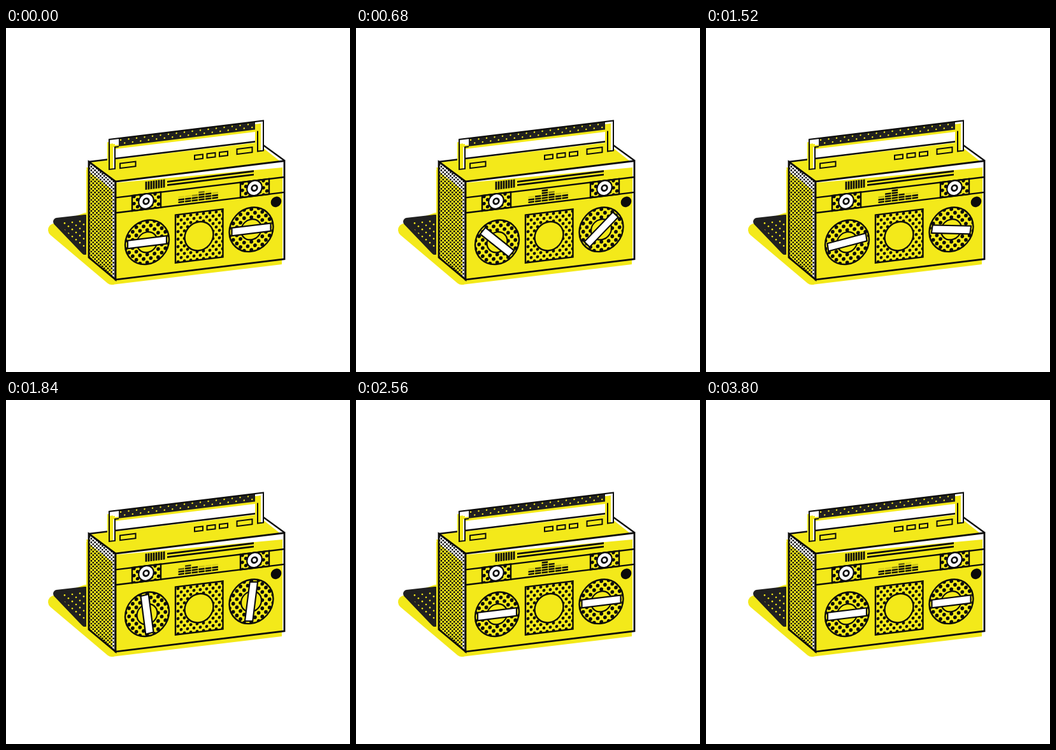
Animation of 540 by 540 pixels, one loop 3840 ms. Source, as an HTML page with a canvas:

```html
<!DOCTYPE html>
<html lang="en">
<head>
<meta charset="utf-8">
<title>Boombox</title>
<style>
html, body { margin: 0; width: 100%; height: 100%; overflow: hidden; background: #fff; }
canvas { display: block; width: 540px; height: 540px; }
</style>
</head>
<body>
<canvas id="stage" width="540" height="540"></canvas>
<script>
const ctx = document.getElementById('stage').getContext('2d');
const LOOP = 3840, TURN = LOOP / 3;
const YELLOW = '#f3e91a', INK = '#0b0b0b', DARK = '#202020', WHITE = '#fff';
const SLOPE = -0.122;

function paint(fill, stroke, width = 2.4) {
  if (fill) { ctx.fillStyle = fill; ctx.fill(); }
  if (stroke) { ctx.strokeStyle = stroke; ctx.lineWidth = width; ctx.stroke(); }
}

function poly(points, ...style) {
  ctx.beginPath();
  points.forEach(([x, y]) => ctx.lineTo(x, y));
  ctx.closePath();
  paint(...style);
}

function rect(x, y, w, h, ...style) {
  ctx.beginPath();
  ctx.rect(x, y, w, h);
  paint(...style);
}

function circle(x, y, r, ...style) {
  ctx.beginPath();
  ctx.arc(x, y, r, 0, 2 * Math.PI);
  paint(...style);
}

function line(x1, y1, x2, y2, width = 2.4) {
  ctx.beginPath();
  ctx.moveTo(x1, y1);
  ctx.lineTo(x2, y2);
  paint(null, INK, width);
}

// Draws in the plane of the front face: u runs along it, v straight down.
function onFace(x, y, drawing) {
  ctx.save();
  ctx.transform(1, SLOPE, 0, 1, x, y);
  drawing();
  ctx.restore();
}

// Staggered dots clipped to the current path.
function dots(x, y, w, h, stepX, stepY, radius, color, slope = 0) {
  ctx.save();
  ctx.clip();
  for (let row = 0; row * stepY <= h; row++) {
    for (let dx = (row % 2) * stepX / 2; dx <= w; dx += stepX) {
      circle(x + dx, y + row * stepY + dx * slope, radius, color);
    }
  }
  ctx.restore();
}

function drawShadow() {
  ctx.lineJoin = 'round';
  poly([[76, 317], [126, 300], [166, 393]], YELLOW, YELLOW, 20);
  poly([[126, 219], [433, 216], [433, 371], [166, 403]], YELLOW);
  poly([[80, 304], [124, 299], [124, 350]], DARK, DARK, 12);
  dots(74, 303, 58, 62, 12, 5.6, 1.3, YELLOW, SLOPE);
  ctx.lineJoin = 'miter';
}

function drawTop() {
  poly([[130, 210], [397, 178], [437, 208], [172, 241]], WHITE);
  poly([[131, 211], [393, 180], [430, 209], [172, 241]], YELLOW);
  line(130, 210, 163, 206);
  line(171, 205, 394, 178);
  line(404, 184, 437, 208);
  onFace(172, 241, () => {
    rect(7, -27.6, 24.5, 7.5, YELLOW, INK, 2);
    rect(190.5, -27.6, 24, 8, YELLOW, INK, 2);
    for (let i = 0; i < 3; i++) rect(124 + i * 19.5, -26, 13, 6.5, YELLOW, INK, 2);
  });
}

function drawSide() {
  const side = [[130, 210], [172, 241], [172, 395], [130, 360]];
  poly(side, WHITE);
  poly([[126, 222], [167, 254], [167, 391], [126, 358]], YELLOW);
  poly(side);
  dots(131, 209, 42, 186, 5.8, 2.9, 1.45, INK);
  poly(side, null, INK, 2.8);
}

function drawDial(u) {
  rect(u, 25.3, 45, 24, YELLOW);
  dots(u + 3, 27, 42, 24, 11, 5.6, 2.7, INK);
  rect(u, 25.3, 45, 24, null, INK);
  circle(u + 22, 36.8, 11.8, WHITE, INK, 2.2);
  circle(u + 22, 36.8, 4.3, WHITE, INK, 2.8);
}

function drawGrille() {
  rect(94, 64, 74.5, 75, YELLOW);
  dots(98, 67, 72, 74, 10, 5.9, 2.4, INK);
  rect(94, 64, 74.5, 75, null, INK);
  circle(131, 101.7, 22.5, YELLOW, INK);
}

function drawReel(u, angle) {
  const v = 101.3;
  circle(u, v, 34.5, YELLOW);
  dots(u - 34, v - 32, 70, 68, 11.4, 6.4, 2.9, INK);
  circle(u, v, 34.5, null, INK);
  circle(u, v, 16, YELLOW, INK, 2.2);
  ctx.save();
  ctx.translate(u, v);
  ctx.rotate(angle);
  rect(-30.5, -6.2, 61, 12.4, WHITE, INK, 2.2);
  ctx.restore();
}

// A bump of sound that wanders across six short columns.
function drawEqualizer(t) {
  const phase = 2 * Math.PI * t / LOOP;
  const centre = 2.2 + 0.7 * Math.cos(phase) + 0.4 * Math.cos(3 * phase);
  const height = 2.7 - 1.1 * Math.cos(4 * phase);
  for (let col = 0; col < 6; col++) {
    const level = 2.1 + height * Math.exp(-((col - centre) ** 2));
    for (let k = 0; k < level; k++) {
      ctx.globalAlpha = Math.min(1, level - k);
      rect(98.5 + col * 10.6, 43.4 - k * 3.9, 9.4, 2.6, INK);
    }
  }
  ctx.globalAlpha = 1;
}

function drawFront(t) {
  rect(0, 0, 265, 154, WHITE);
  poly([[0, 2], [262, 10], [262, 154], [0, 154]], YELLOW);
  for (const v of [25.4, 49.2]) line(0, v, 265, v);
  for (let i = 0; i < 8; i++) line(48 + i * 4, 6, 48 + i * 4, 18.8, 2.8);
  for (const v of [10.2, 15.6]) line(81, v, 217, v, 2.8);
  drawDial(26);
  drawDial(196);
  circle(252, 62.7, 8.3, INK);
  drawGrille();
  rect(0, 0, 265, 154, null, INK, 2.8);
  drawEqualizer(t);
  const angle = reelAngle(t);
  drawReel(49.5, -angle);
  drawReel(213, angle);
}

function drawHandle() {
  onFace(162, 175, () => {
    rect(-3, 4, 12, 43, YELLOW);
    rect(229, 4, 9, 45, YELLOW);
    rect(9, 10, 220, 6, YELLOW);
    rect(0, 0, 242, 8, WHITE);
    rect(0, 7, 6, 40, YELLOW);
    rect(6, 13, 3, 34, WHITE);
    rect(229, 4, 9, 43, YELLOW);
    rect(238, 0, 4, 47, WHITE);
    rect(15, 0, 214, 12.5, DARK);
    dots(18, 3, 212, 10, 12.5, 5.4, 1.25, YELLOW);
    ctx.beginPath();
    ctx.moveTo(15, 13);
    for (const [u, v] of [[9, 13], [9, 47], [0, 47], [0, 0], [242, 0], [242, 47], [233, 47], [233, 15]]) {
      ctx.lineTo(u, v);
    }
    paint(null, INK, 2);
  });
}

// Cubic Bezier timing with a slow start and a longer, softer stop.
function ease(x) {
  let low = 0, high = 1, s = 0.5;
  for (let i = 0; i < 24; i++) {
    s = (low + high) / 2;
    const at = 1.8 * s * (1 - s) ** 2 + 0.6 * s * s * (1 - s) + s ** 3;
    if (at < x) low = s; else high = s;
  }
  return s * s * (3 - 2 * s);
}

// Half a turn, three times per loop.
function reelAngle(t) {
  return Math.PI * ease((t % TURN) / TURN);
}

function draw(t) {
  ctx.fillStyle = WHITE;
  ctx.fillRect(0, 0, 540, 540);
  drawShadow();
  drawTop();
  drawSide();
  onFace(172, 241, () => drawFront(t));
  drawHandle();
}

const start = performance.now();
function tick() {
  const elapsed = (performance.now() - start) % LOOP;
  draw(Math.floor(elapsed / 40) * 40);
  requestAnimationFrame(tick);
}
tick();
</script>
</body>
</html>
```
